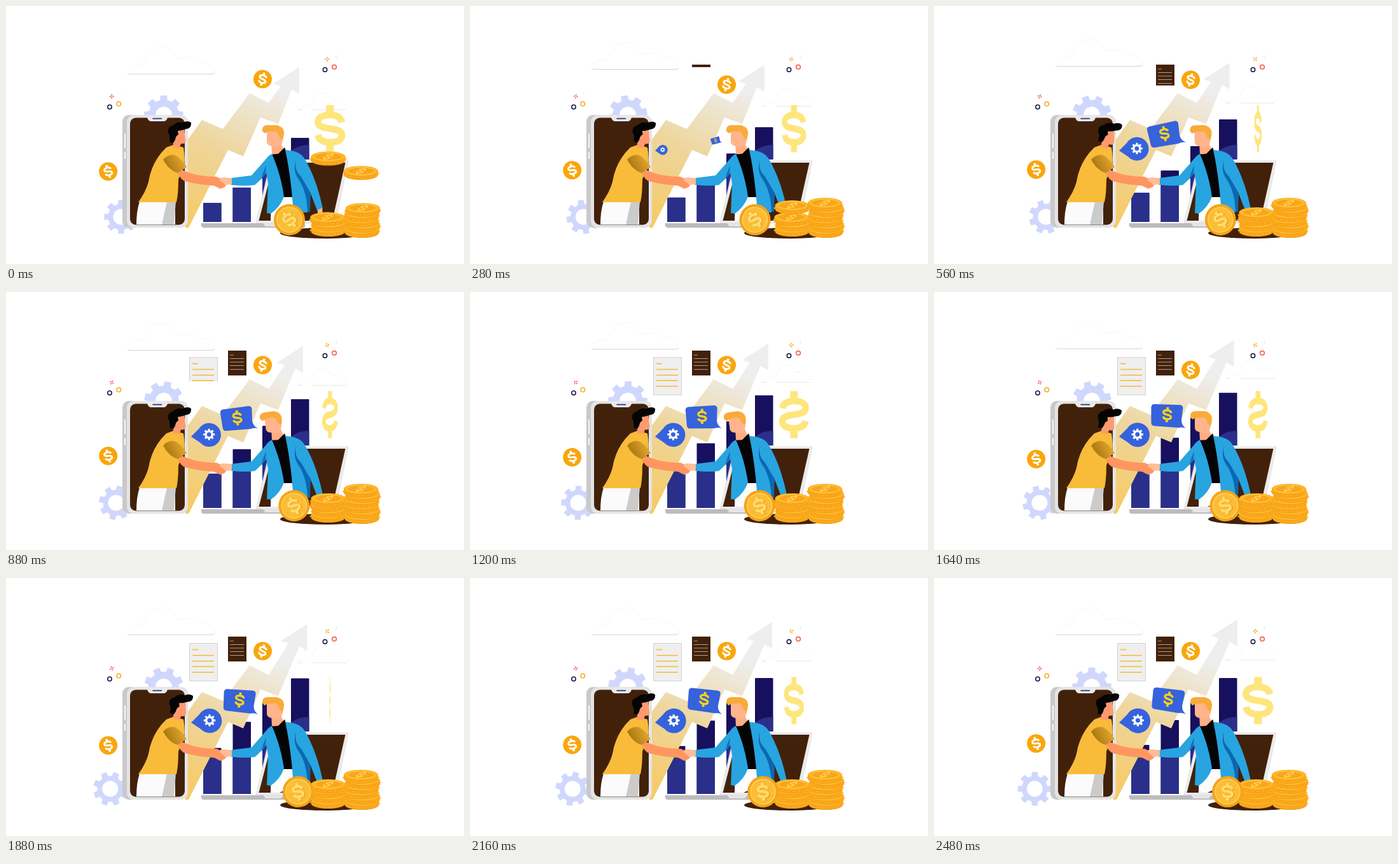
Write an HTML page that moves like this. It is 720x405 px and loops after 2.52 s.

```html
<!DOCTYPE html>
<html lang="en">
<head>
<meta charset="utf-8">
<title>Business deal</title>
<style>
  html, body { margin: 0; width: 100%; height: 100%; overflow: hidden; background: #fff; }
  svg { display: block; width: 720px; height: 405px; }
  .cloud { fill: none; stroke: #b9b9c2; stroke-width: .6; stroke-dasharray: 1 5; }
  .base { fill: none; stroke: #a5a5ad; stroke-width: .5; }
  .ring { fill: none; stroke-width: 1.5; }
  .spark { stroke-width: 1.4; stroke-dasharray: 2.7 1.9; }
  .gear { fill: #d0d7fd; fill-rule: evenodd; }
</style>
</head>
<body>
<svg viewBox="0 0 720 405">
  <defs>
    <g id="usd" fill="none" stroke="currentColor" stroke-width="10.5">
      <path d="M19-10C17-18 10-21.500 0-21.500C-12-21.500-19-17-19-10.500C-19 5 19-5 19 10.500C19 17 12 21.500 0 21.500C-10 21.500-17 18-19 10"/>
      <path d="M0-37V-22M0 22V37" stroke-width="12"/>
    </g>
    <g id="flat">
      <path d="M-27 0V6A27 8 0 0 0 27 6V0Z" fill="#f79d0e"/>
      <path d="M-27 3A27 8 0 0 0 27 3" fill="none" stroke="#fbb02c" stroke-width="4" stroke-dasharray="2 1.6"/>
      <ellipse rx="27" ry="8" fill="#fdb522"/>
      <ellipse rx="21.500" ry="6" fill="#f9a51a" stroke="#ffcf55"/>
      <use href="#usd" color="#ffcd54" transform="rotate(-12) scale(.3 .13) rotate(50)"/>
    </g>
    <g id="badge">
      <circle r="14.500" fill="#f9a60c"/>
      <use href="#usd" color="#fff" transform="scale(.28)"/>
    </g>
    <linearGradient id="gold" gradientUnits="userSpaceOnUse" x1="290" y1="348" x2="400" y2="115">
      <stop offset="0" stop-color="#f7ca62"/>
      <stop offset=".5" stop-color="#eed59a"/>
      <stop offset="1" stop-color="#eeeeee"/>
    </linearGradient>
    <linearGradient id="sleeve" x1="0" y1=".7" x2="1" y2=".3">
      <stop offset="0" stop-color="#a06f0c"/>
      <stop offset="1" stop-color="#e9ad31"/>
    </linearGradient>
    <clipPath id="clipA"><rect id="revA" x="287" y="101" width="47"/></clipPath>
    <clipPath id="clipB"><rect id="revB" x="348" y="92" width="31"/></clipPath>
  </defs>

  <!-- clouds -->
  <g id="cloud1">
    <path class="cloud" d="M193 80C202 72 212 78 219 68C226 42 260 38 270 66C282 62 296 62 302 70C315 68 326 76 328 88"/>
    <path class="base" d="M191 87Q192 89 196 89H322Q327 89 328 87"/>
  </g>
  <g id="cloud2">
    <path class="cloud" d="M460 128C466 122 476 126 483 116C488 98 506 98 512 114C522 110 533 116 537 128"/>
    <path class="base" d="M458 129H466M482 129H536" opacity=".5"/>
  </g>

  <!-- sparks -->
  <path id="sparkL" class="spark" d="M-3.500 0H3.500M0-3.500V3.500" stroke="#f0573f"/>
  <path id="sparkR" class="spark" d="M-3.800 0H3.800M0-3.800V3.800" stroke="#f3a32c"/>
  <path d="M516 80H523M519.500 77V83M178 138H184" stroke="#d5d8dc" stroke-width=".8" stroke-dasharray="1.5 2"/>
  <circle class="ring" cx="163" cy="158.500" r="3.200" stroke="#17133f"/>
  <circle class="ring" cx="177.300" cy="153.500" r="3.300" stroke="#f5a623"/>
  <circle class="ring" cx="501.500" cy="100" r="3.200" stroke="#17133f"/>
  <circle class="ring" cx="516" cy="95.700" r="3.300" stroke="#ee5240"/>

  <path id="gearTop" class="gear"/>
  <path id="gearLow" class="gear"/>

  <!-- chart -->
  <g id="bars"></g>
  <path id="arrow" fill="url(#gold)"/>

  <!-- documents -->
  <g clip-path="url(#clipA)">
    <rect x="288.500" y="102.500" width="44" height="59" fill="#efefee" stroke="#c9c9c9" stroke-width=".8"/>
    <path d="M293 112.500H302M293 121.500H327M293 130.500H327M293 139H327M293 148H327" stroke="#f3b83c" stroke-width="1.300"/>
  </g>
  <g clip-path="url(#clipB)">
    <rect x="349" y="92" width="29" height="39" fill="#42210b"/>
    <path d="M352 99H358M352 104.500H374M352 110H374M352 115.500H374M352 121.500H374" stroke="#b19f90"/>
  </g>

  <!-- phone -->
  <rect x="183" y="171" width="100" height="177" rx="10" fill="#c9c9cb"/>
  <rect x="190" y="171" width="96" height="177" rx="11" fill="#e4e4e5"/>
  <rect x="195" y="175.500" width="86" height="168" rx="9" fill="#42210b"/>
  <path d="M221 172H255Q253 181 248 181H228Q223 181 221 172Z" fill="#e9e9ea"/>
  <path d="M230.500 176.700H245" stroke="#29307f" stroke-width="1.700"/>
  <path d="M187 200V223M187 229V240" stroke="#f7f7f7" stroke-width="2"/>

  <!-- laptop -->
  <path d="M416 243H538L518 341H393Z" fill="#ebebeb" stroke="#d6d6d8" stroke-width=".6"/>
  <path d="M421 246H533.500L513 337H397.500Z" fill="#42210b"/>
  <path d="M306.500 341H470V348H310Q306.500 347 306.500 341Z" fill="#bcbcc0"/>
  <path d="M404 341H436L432 346H408Z" fill="#e5e5e7"/>

  <!-- left man -->
  <path d="M210 307H266V343H205Q205 322 210 307Z" fill="#fbfbfb"/>
  <path d="M253 307H267L264 343H245Z" fill="#cbcbcc"/>
  <path d="M252 222L263 218L279 222Q282 238 280 252L271 272Q271 294 268 308H208Q220 291 224 276Q229 244 252 222Z" fill="#f8bb3a"/>
  <g id="headL">
    <path d="M262 194L280 193L282.500 213Q281 217 275 216L273 223L263 222Z" fill="#ff9a6f"/>
    <path d="M257 213Q259 205 255 199Q253 190 263 187Q268 181 278 183Q286 179 291 183Q292 192 283 193Q275 196 270 196L271 202Q267 203 266 210L263 215Z" fill="#050505"/>
  </g>
  <path d="M267 255Q278 257 286 261Q304 268 331 268L342 273Q350 279 344 284L337 287L327 282Q296 280 279 274Q271 268 267 255Z" fill="#ff965f"/>
  <path d="M247 241Q255 232 265 234Q276 239 284 253L270 262Q256 258 247 241Z" fill="url(#sleeve)"/>

  <!-- speech bubbles -->
  <g id="talkA">
    <path d="M0 0L13-13A19.500 19.500 0 1 1 15 10Z" fill="#3662dc"/>
    <path id="gearTalk" fill="#fff" fill-rule="evenodd" transform="translate(29.500 -3.500)"/>
  </g>
  <g id="talkB">
    <path d="M-53-34Q-57-33-57-29L-55-4Q-54 0-50 0H-12Q-6-2 0 0Q-7-4-8-12L-7-32Q-8-36-12-36Z" fill="#3662dc"/>
    <use href="#usd" color="#ffd217" transform="translate(-31 -19) scale(.32)"/>
  </g>

  <!-- right man -->
  <path d="M417 297H451L453 326L430 337H416Z" fill="#fcfcfc"/>
  <path d="M417 213L432 216L437 226L429 236L418 232Z" fill="#ffae84"/>
  <path d="M417 233L428 232L438 222L442 232L451 300H436Z" fill="#050505"/>
  <path d="M418 232Q412 235 408 241L386 266L354 270L354 281Q378 283 391 281Q400 274 409 262L412 278L410 325L416 326Q431 316 437 299Q432 264 418 232Z" fill="#28a4e1"/>
  <path d="M409 250L408 262L401 273Q403 262 409 250Z" fill="#1273b5"/>
  <path d="M439 226Q461 227 469 239Q488 270 498 318L490 323L478 292L474 324H452L449 290Q445 253 439 226Z" fill="#28a4e1"/>
  <path d="M456 240Q452 257 464 268L479 294L478 323H474Q473 291 460 272Q450 258 456 240Z" fill="#0b68b0"/>
  <path d="M490 320L497 317L498 326L490 329Z" fill="#ffb68d"/>
  <path d="M355 270V280L345 281L337 274Q334 270 340 269Z" fill="#ffbd96"/>
  <g id="headR">
    <path d="M410 197L428 195L436 207L432 221Q425 223 418 220Q411 219 410 214Z" fill="#ffb48b"/>
    <path d="M403 196Q402 188 410 187H426Q437 190 437 199Q437 206 434 210L430 207Q429 199 424 197Q414 196 406 200Z" fill="#f8ab38"/>
  </g>

  <use id="bigUsd" href="#usd" color="#fee67d"/>

  <!-- coins -->
  <ellipse cx="501" cy="356.500" rx="70" ry="8.500" fill="#42210b"/>
  <g id="stacks"></g>
  <use id="dropA" href="#flat"/>
  <use id="dropB" href="#flat"/>
  <g id="wheel">
    <circle r="24.500" fill="#f7a416"/>
    <circle r="19.500" fill="#fbbd35" stroke="#fdd467" stroke-width="1.500"/>
    <use href="#usd" color="#f19f17" transform="translate(1.500 1) scale(.38)"/>
    <use href="#usd" color="#ffdc70" transform="scale(.38)"/>
  </g>
  <use id="coinTop" href="#badge"/>
  <use id="coinLeft" href="#badge"/>
</svg>

<script>
  const LOOP = 2520, STEP = 40, TAU = 2 * Math.PI;
  const $ = id => document.getElementById(id);
  const set = (id, name, value) => $(id).setAttribute(name, value);
  const move = (id, x, y, rest = '') => set(id, 'transform', `translate(${x} ${y}) ${rest}`);

  const mix = (a, b, k) => a + (b - a) * k;
  const ramp = (t, from, to) => Math.min(1, Math.max(0, (t - from) / (to - from)));
  const easeOut = (k, power) => 1 - (1 - k) ** power;
  const pulse = (t, peak, period) => Math.max(0, Math.cos(TAU * (t - peak) / period)) ** 2;

  function gear(outer, body, hole) {
    const pts = [];
    for (let i = 0; i < 8; i++) {
      for (const [off, r] of [[-.24, body], [-.17, outer], [.17, outer], [.24, body]]) {
        const a = i * TAU / 8 + off;
        pts.push(`${r * Math.sin(a)} ${-r * Math.cos(a)}`);
      }
    }
    const arc = dx => `a${hole} ${hole} 0 1 0 ${dx} 0`;
    return `M${pts.join('L')}ZM${-hole} 0${arc(2 * hole)}${arc(-2 * hole)}Z`;
  }

  function stack(x, y, count) {
    let out = '';
    for (let i = 0; i < count; i++) {
      out += `<use href="#flat" x="${x + 1.5 * Math.sin(i * 2)}" y="${y - 8.2 * i}"/>`;
    }
    return out;
  }

  const bars = [
    { x: 310, from: 309, to: 262, edge: 282, lift: 3, base: 339 },
    { x: 356.5, from: 285, to: 223, edge: 283, lift: 4, base: 339 },
    { x: 403, from: 246, to: 195, edge: 252, lift: 4, base: 339 },
    { x: 448, from: 207, to: 157, edge: 227, lift: 9, base: 241 }
  ];

  function bar({ x, from, to, edge, lift, base }, i, k) {
    const w = 28.5, y = mix(from, to, easeOut(k, 1.6 + .6 * i));
    const low = Math.max(y, edge), high = Math.max(y, edge - lift);
    return `<rect x="${x}" y="${y}" width="${w}" height="${base - y}" rx="1" fill="#17105f"/>` +
      `<path d="M${x} ${low}Q${x + w * .4} ${high} ${x + w} ${high}V${base}H${x}Z" fill="#2a308a"/>`;
  }

  function arrow(k) {
    const head = [[432, 126], [420, 122], [461, 96], [461, 138], [449, 131]]
      .map(([x, y]) => `${x + 16 * k} ${y - 31 * k}`);
    return `M287 348H282V215L308 179L341 193L383 137L413 152L${head.join('L')}L428 185L400 175L373 236L349 226Z`;
  }

  function draw(t) {
    const k = t / (LOOP - STEP);
    const wave = Math.sin(TAU * k);

    $('bars').innerHTML = bars.map((b, i) => bar(b, i, k)).join('');
    set('arrow', 'd', arrow(k));

    move('gearLow', 181 - 22.7 * k, 331, `rotate(${-90 * k})`);
    move('gearTop', 248, 171, `rotate(${-90 * k})`);
    move('sparkL', 166.3, 142, `rotate(${90 * k})`);
    move('sparkR', 505, 83.5, `rotate(${180 * k})`);
    move('cloud1', 0, 18 * (1 - k) ** 4.5);
    move('cloud2', 0, 34 * (1 - k) ** 1.5);

    set('revA', 'height', 62 * ramp(t, 600, 1040));
    set('revB', 'height', 39 * ramp(t, 240, 620));
    move('talkA', 291, 227, `scale(${ramp(t, 160, 440) * mix(.93, 1, k)})`);
    move('talkB', 396, 214, `rotate(${9.5 - 28.6 * (1 - k) ** 1.6}) scale(${ramp(t, 200, 480)})`);

    set('headL', 'transform', `rotate(${9 * pulse(t, 500, 1240)} 268 219)`);
    set('headR', 'transform', `rotate(${-9 * pulse(t, 1040, 2480)} 424 225)`);

    const turn = TAU * k - .14 * Math.sin(Math.PI * k);
    move('bigUsd', 509.3, 192.5, `scale(${Math.cos(turn)} 1)`);

    move('dropA', 506.5, mix(236.5, 324, ramp(t, 0, 320)));
    move('dropB', 558, mix(259, 309, ramp(t, 0, 240)));
    move('wheel', 445.5 + 16 * easeOut(k, 1.4), 335.5, `rotate(${-42 * (1 - k)})`);
    move('coinTop', 403.5, 114.8 + 9 * pulse(t, 1560, 1240), 'rotate(14)');
    move('coinLeft', 160.7, 259.7 - 3 * wave, 'rotate(-16)');
  }

  function tick() {
    draw(Math.floor(performance.now() % LOOP / STEP) * STEP);
    requestAnimationFrame(tick);
  }

  set('gearTop', 'd', gear(31, 24, 13));
  set('gearLow', 'd', gear(27, 20.5, 12.5));
  set('gearTalk', 'd', gear(9.5, 7, 3.6));
  $('stacks').innerHTML = stack(506.5, 348, 3) + stack(559.5, 350, 5);
  tick();
</script>
</body>
</html>
```
